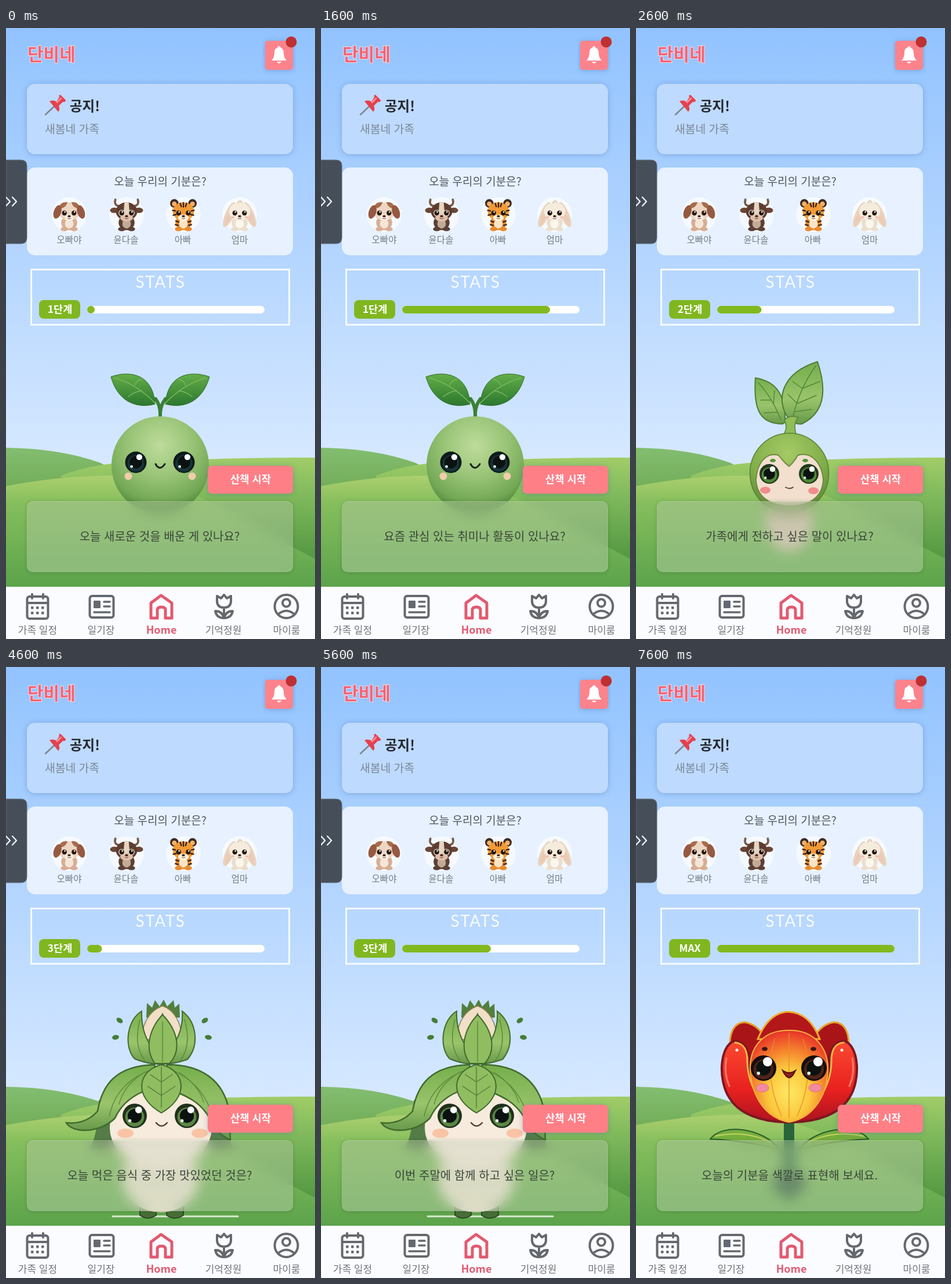
Write an HTML page that moves like this. It is 533x1051 px and loops after 8.6 s.

```html
<!DOCTYPE html>
<html lang="ko">
<head>
<meta charset="utf-8">
<title>가족 정원</title>
<style>
  html, body { margin: 0; width: 100%; height: 100%; overflow: hidden; background: #93c4ff; }
  svg { position: absolute; left: 0; top: 0; }
  text { font-family: "Noto Sans CJK KR", "Noto Sans CJK", "Noto Sans", sans-serif; }
  .mid { text-anchor: middle; }
  #panel {
    position: absolute; left: 36px; top: 814px; width: 459px; height: 122px;
    box-sizing: border-box; border-radius: 10px; border: 1px solid rgba(255,255,255,.12);
    background: linear-gradient(rgba(190,200,180,.36), rgba(215,222,205,.34));
    backdrop-filter: blur(11px); box-shadow: 0 1px 6px rgba(30,70,20,.25);
  }
</style>
</head>
<body>
<svg id="scene" width="533" height="1051" viewBox="0 0 533 1051"></svg>
<div id="panel"></div>
<svg id="ui" width="533" height="1051" viewBox="0 0 533 1051"></svg>
<script>
const $ = id => document.getElementById(id);

const gradient = (id, kind, attrs, ...stops) =>
  `<${kind}Gradient id="${id}" ${attrs}>` +
  stops.map(([at, c]) => `<stop offset="${at}" stop-color="${c}"/>`).join('') +
  `</${kind}Gradient>`;
const down = (id, ...stops) => gradient(id, 'linear', 'x1="0" y1="0" x2="0" y2="1"', ...stops);
const path = (d, fill, rest = '') => `<path d="${d}" fill="${fill}" ${rest}/>`;
const line = (d, color, w = 2) =>
  path(d, 'none', `stroke="${color}" stroke-width="${w}" stroke-linecap="round" stroke-linejoin="round"`);
const oval = (x, y, rx, ry, fill, rest = '') =>
  `<ellipse cx="${x}" cy="${y}" rx="${rx}" ry="${ry}" fill="${fill}" ${rest}/>`;
const dot = (x, y, r, fill, rest) => oval(x, y, r, r, fill, rest);
const box = (x, y, w, h, r, fill, rest = '') =>
  `<rect x="${x}" y="${y}" width="${w}" height="${h}" rx="${r}" fill="${fill}" ${rest}/>`;
const label = (x, y, size, fill, str, rest = 'class="mid"') =>
  `<text x="${x}" y="${y}" font-size="${size}" fill="${fill}" ${rest}>${str}</text>`;
const mirror = (axis, s) => s + `<g transform="matrix(-1 0 0 1 ${2 * axis} 0)">${s}</g>`;

function eye(x, y, r, rim, iris) {
  return dot(x, y, r, rim) + dot(x, y + r * .1, r * .78, iris) + dot(x, y, r * .58, '#0c1210') +
    dot(x + r * .32, y - r * .48, r * .28, '#fff') + dot(x - r * .4, y + r * .4, r * .13, '#dff0e4');
}
const eyes = (x1, x2, y, r, rim, iris) => eye(x1, y, r, rim, iris) + eye(x2, y, r, rim, iris);

const sprout =
  line('M266 668 Q267 650 258 638 M266 662 Q267 648 275 638', '#3b7f35', 6) +
  mirror(266,
    path('M257 647 C222 656 192 640 181 600 C214 588 254 596 257 647Z', 'url(#leaf)', 'stroke="#2d6b2b"') +
    line('M257 645 Q225 612 187 602 M234 624 Q222 625 211 634 M222 614 Q226 606 235 604', '#79b85c', 1.5)) +
  dot(266, 752, 84, 'url(#ball)') +
  eyes(224, 307, 747, 18.5, '#0e1a1a', '#17353a') +
  dot(211, 771, 6.5, '#f2cdaa') + dot(321, 771, 6.5, '#f2cdaa') +
  line('M258 750 Q265 763 274 750', '#16220f', 3);

const seedling =
  oval(264, 846, 40, 54, '#cfc0a8') +
  path('M253 681 C216 681 202 660 206 602 C242 608 258 630 257 678Z', 'url(#leaf2)', 'stroke="#4c7d33" stroke-width="2"') +
  line('M250 674 Q235 636 211 610 M237 647 L239 624 M232 640 L215 640 M244 661 L221 662', '#4f8a39', 1.5) +
  path('M262 670 C241 640 250 594 313 574 C327 615 330 660 286 681 Q271 683 262 670Z', 'url(#leaf2)', 'stroke="#4c7d33" stroke-width="2"') +
  line('M270 674 Q279 625 310 581 M278 646 L262 630 M278 646 L311 632 M287 620 L270 608 M287 620 L317 608 M274 660 L303 656', '#4f8a39', 1.5) +
  path('M253 702 Q263 687 256 675 Q264 664 280 670 Q270 678 277 703Z', '#8fbe58', 'stroke="#55843a" stroke-width="1.5"') +
  oval(264.5, 766, 68, 69, 'url(#hood)', 'stroke="#587f38" stroke-width="1.5"') +
  path('M207 777 C209 746 226 729 246 735 Q254 746 264 754 Q273 746 279 735 C304 728 321 750 323 777 C322 805 302 822 264 822 C228 822 208 804 207 777Z', '#f2dfce', 'stroke="#6d8a42" stroke-width="2"') +
  eyes(230, 298, 767, 17, '#26371f', '#4f8a37') +
  oval(236, 744, 5, 3, '#55933c') + oval(292, 744, 5, 3, '#55933c') +
  oval(223, 795, 9, 6, '#f08d8d') + oval(306, 796, 9, 6, '#f08d8d') +
  line('M258 790 Q265 794 271 790', '#5d4434', 2);

const bud =
  line('M184 945 H400', '#d9ead2', 3) +
  path('M231 925 H259 V943 Q245 953 231 943Z M277 925 H306 V943 Q291 953 277 943Z', '#486f38', 'stroke="#294a23" stroke-width="2"') +
  path('M160 745 Q160 800 144 830 H391 Q378 790 378 745Z', '#547c46') +
  oval(267, 880, 66, 58, '#e1ddc4') +
  oval(267, 792, 88, 72, '#f6ebdc') +
  path('M256 684 C190 686 166 718 158 764 C143 781 124 786 104 784 C114 802 161 803 188 776 C203 743 232 729 268 720Z', 'url(#leaf2)', 'stroke="#416a2d" stroke-width="2.5"') +
  path('M278 684 C336 684 376 710 385 765 L387 814 Q360 800 351 776 C333 743 302 735 268 720Z', 'url(#leaf2)', 'stroke="#416a2d" stroke-width="2.5"') +
  line('M250 693 Q190 715 178 773 M239 697 Q204 718 195 752 M288 694 Q342 718 356 774 M299 698 Q332 718 341 749', '#5f8d3d', 1.5) +
  path('M268 684 C228 694 218 738 268 767 C318 738 308 694 268 684Z', '#91bd61', 'stroke="#416a2d" stroke-width="2"') +
  line('M268 688 V758 M268 714 L249 701 M268 714 L287 701 M268 737 L244 721 M268 737 L292 721', '#527f38', 1.5) +
  path('M242 603 L243 578 L252 586 L257 573 L265 584 L272 572 L278 584 L289 573 L291 586 L299 579 L300 603Z', '#527f3c') +
  path('M233 640 Q238 595 270 583 Q301 594 305 645Z', '#f2dfc8', 'stroke="#8a8055" stroke-width="1.5"') +
  path('M234 592 C208 607 203 655 222 674 Q265 692 313 675 C334 650 329 611 304 592 Q306 625 289 649 L270 597 L248 649 Q233 625 234 592Z', 'url(#leaf2)', 'stroke="#416a2d" stroke-width="2"') +
  path('M270 598 C244 626 240 660 257 682 H282 C303 660 297 626 270 598Z', '#91bd61', 'stroke="#416a2d" stroke-width="2"') +
  line('M231 607 Q219 650 240 678 M308 607 Q321 650 300 678 M270 610 V679', '#5c8a3d', 1.5) +
  [[196, 608, 35], [189, 637, -10], [343, 608, -35], [349, 637, 10]].map(([x, y, a]) =>
    oval(x, y, 6, 4, '#447d39', `transform="rotate(${a} ${x} ${y})"`)).join('') +
  eyes(222, 312, 772, 21, '#20301d', '#5b8745') +
  oval(206, 802, 14, 8, '#f9c4a5') + oval(334, 802, 14, 8, '#f9c4a5') +
  line('M259 784 Q268 795 278 784', '#54402f', 2.5);

const tulip =
  path('M255 776 H273 V916 H255Z', '#28663a') +
  oval(264, 888, 29, 22, '#35633b') +
  mirror(264.5,
    path('M128 812 C149 784 219 792 248 830 Q185 814 128 812Z', '#77af3e', 'stroke="#275c29" stroke-width="2"') +
    line('M137 807 Q190 796 232 818', '#c3d363', 2) +
    path('M162 660 C160 630 168 612 187 611 Q209 614 222 637 L210 690Z', '#a91419', 'stroke="#e9a32c" stroke-width="3"')) +
  path('M210 640 Q229 594 263 593 Q300 595 317 640Z', '#b3171a', 'stroke="#efae32" stroke-width="3"') +
  mirror(264.5,
    path('M170 643 C144 651 141 711 161 741 C178 769 215 782 259 783 C209 748 193 711 196 671 Q190 645 170 643Z', 'url(#petal)', 'stroke="#7d1720" stroke-width="4"') +
    line('M171 646 C188 648 192 661 192 680 C193 724 221 761 253 779', '#f6b642', 3) +
    line('M156 673 Q151 698 161 721', '#ff7768', 3)) +
  path('M264 625 C217 624 195 657 197 694 C200 741 224 776 264 783 C304 776 329 741 331 694 C332 657 309 624 264 625Z', 'url(#flame)', 'stroke="#f2b33d" stroke-width="2"') +
  line('M264 630 V776 M239 640 Q220 705 251 772 M288 640 Q309 705 278 772', '#eb8c2c', 1.3) +
  eyes(220, 307, 690, 22, '#160d0b', '#4e2417') +
  dot(227, 679, 8, '#fff') + dot(314, 679, 8, '#fff') +
  oval(222, 657, 5, 3.5, '#3b1613') + oval(306, 657, 5, 3.5, '#3b1613') +
  oval(218, 724, 11, 7, '#f28aa0', 'stroke="#e66d80"') + oval(309, 724, 11, 7, '#f28aa0', 'stroke="#e66d80"') +
  path('M253 694 Q264 719 275 694 Q264 702 253 694Z', '#8c1f1b', 'stroke="#571311" stroke-width="2"') +
  dot(174, 659, 2.5, '#fff') + dot(355, 659, 2.5, '#fff');

const friends = [sprout, seedling, bud, tulip];

$('scene').innerHTML = '<defs>' +
  down('sky', [0, '#92c3ff'], [.5, '#b3d5ff'], [1, '#d9eaff']) +
  down('far', [0, '#83bd70'], [.3, '#72ad58'], [1, '#5b9b45']) +
  down('side', [0, '#a1cd68'], [.3, '#7fb95c'], [.75, '#569a43'], [1, '#559a43']) +
  down('near', [0, '#accf6e'], [.25, '#85be5d'], [1, '#5ca34b']) +
  down('leaf', [0, '#64ad48'], [1, '#2b782f']) +
  down('leaf2', [0, '#75ae4c'], [.6, '#9ac46b'], [1, '#67994a']) +
  down('petal', [0, '#fb4a31'], [.6, '#e8211f'], [1, '#ad1320']) +
  gradient('ball', 'radial', 'cx=".5" cy=".3" r=".72"', [0, '#bedc9c'], [.45, '#99c477'], [.8, '#73a855'], [1, '#4c8238']) +
  gradient('hood', 'radial', 'cx=".48" cy=".25" r=".8"', [0, '#a5ca66'], [.6, '#80ae48'], [1, '#577f32']) +
  gradient('flame', 'radial', 'cx=".5" cy=".68" r=".68"', [0, '#ffe965'], [.4, '#fbc83d'], [.72, '#f47b2c'], [1, '#e8332a']) +
  '</defs>' +
  '<rect width="533" height="770" fill="url(#sky)"/>' +
  path('M0 722 Q92 723 163 748 L240 790 V961 H0Z', 'url(#far)') +
  path('M95 770 Q155 746 245 746 Q390 738 533 739 V961 H95Z', 'url(#side)') +
  path('M0 788 Q95 770 180 770 C300 768 414 852 533 913 V961 H0Z', 'url(#near)') +
  friends.map((f, i) => `<g id="friend${i}">${f}</g>`).join('');

function face(x, body, head, belly, ears, extra) {
  return dot(x, 321, 30, '#fff', 'opacity=".65"') + `<g transform="translate(${x} 321) scale(.92)">` +
    oval(0, 15, 15, 14, body) + oval(0, 17, 8, 9, belly) +
    oval(-9, 27, 7, 4, body) + oval(9, 27, 7, 4, body) +
    ears + oval(0, -6, 20, 17, head) + extra +
    dot(-9, -3, 4.5, '#251712') + dot(9, -3, 4.5, '#251712') +
    dot(-8, -5, 1.4, '#fff') + dot(10, -5, 1.4, '#fff') +
    oval(0, 3, 3, 2, '#392019') + line('M-3 7 Q0 9 3 7', '#60382b', 1) + '</g>';
}
const dog = face(109, '#d7ae94', '#edd6c2', '#f5e6d8', '',
  path('M-3 -23 Q-15 -25 -20 -13 Q-8 -9 -3 -23Z M4 -23 Q16 -25 20 -13 Q9 -9 4 -23Z', '#a76c4c') +
  mirror(0, oval(-22, -5, 7, 13, '#965a42', 'transform="rotate(18 -22 -5)"')) + oval(0, 6, 8, 6, '#faeee3'));
const cow = face(208, '#5b4036', '#5e3d30', '#c1aa96',
  mirror(0, line('M-14 -16 Q-24 -17 -21 -28', '#765a49', 4) + oval(-23, -8, 8, 5, '#6b4637')),
  path('M-4 -23 H4 L6 1 H-6Z', '#e5d5c1') + oval(0, 6, 12, 7, '#dfbea9') +
  dot(-9, -3, 6, '#e9dacb') + dot(9, -3, 6, '#e9dacb'));
const tiger = face(306, '#e88b30', '#f39a35', '#fae4c7',
  mirror(0, dot(-17, -21, 8, '#3f2a21') + dot(-17, -20, 4.5, '#f1b268')),
  line('M0 -22 V-14 M-6 -21 L-4 -15 M6 -21 L4 -15 M-20 -8 L-15 -7 M20 -8 L15 -7 M-19 1 L-14 0 M19 1 L14 0', '#32211b', 2.5) +
  oval(0, 6, 10, 6, '#fff2dd') + line('M-14 12 L-9 14 M14 12 L9 14 M-15 19 L-10 20 M15 19 L10 20', '#32211b', 2.5));
const rabbit = face(403, '#eadfcd', '#f5ecdd', '#fcf6ec',
  mirror(0, oval(-19, 0, 8, 25, '#e8d4bd', 'transform="rotate(23 -19 0)"') +
    oval(-20, 3, 4, 19, '#edc9b7', 'transform="rotate(23 -20 3)"')),
  line('M-3 -22 Q0 -29 4 -23', '#e2d1b7', 3) + oval(-13, 5, 3, 2, '#f3bdb1') + oval(13, 5, 3, 2, '#f3bdb1'));

const gray = '#65696f', pink = '#e25a70', bold = 'class="mid" font-weight="700"';

const header =
  label(37, 56, 30, '#f26375', '단비네', 'font-weight="700" stroke="#ffd6dd" stroke-width="2" paint-order="stroke"') +
  box(447, 22, 48, 50, 5, '#fc838c', 'filter="url(#soft)"') +
  path('M458 56 Q463 51 463 42 Q463 35 468 34 Q471 28 474 34 Q479 36 479 43 Q479 51 484 56Z M467 58 H475 Q471 64 467 58Z', '#fff') +
  dot(492, 24, 9.5, '#be3032');

const notice =
  box(36, 96, 459, 121, 14, '#bedaff', 'filter="url(#soft)"') +
  line('M68 149 L83 135', '#7c8590', 2.5) +
  path('M75 126 Q82 123 87 127 L92 119 Q90 115 94 115 L103 124 Q103 128 98 127 L91 134 Q94 141 90 144Z', '#e5414e') +
  line('M88 128 L95 121', '#ff929a', 2.5) +
  label(110, 143, 23.5, '#24282d', '공지!', 'font-weight="900"') +
  label(67, 181, 19.3, '#7b8795', '새봄네 가족', '');

const moods =
  box(36, 240, 459, 151, 14, '#e7f1ff') +
  label(266, 271, 19, '#4e555e', '오늘 우리의 기분은?', 'class="mid" font-weight="500"') +
  dog + cow + tiger + rabbit +
  ['오빠야', '윤다솔', '아빠', '엄마'].map((s, i) => label(109 + 98 * i, 370, 15.5, '#747b85', s)).join('') +
  path('M0 227 H26 Q36 227 36 237 V361 Q36 371 26 371 H0Z', '#454e59', 'stroke="#69727d"') +
  line('M0 291 L7 298.5 L0 306 M11 291 L18 298.5 L11 306', '#f4f7fa', 2.2);

const stats =
  box(43.5, 415.5, 445, 95, 0, 'none', 'stroke="#f5faff" stroke-width="3"') +
  `<text x="266.5" y="447" class="mid" font-size="28" fill="#f8fbff" style="font-family:Lato,sans-serif" letter-spacing="1.5">STATS</text>` +
  box(57, 468, 71, 32, 8, '#80b720') +
  `<text id="level" x="93" y="490" ${bold} font-size="17.5" fill="#fff"></text>` +
  box(140, 478, 306, 13, 6.5, '#fff') +
  `<rect id="bar" x="140" y="478" height="13" rx="6.5" fill="#82b91f"/>`;

const action =
  box(348, 753, 147, 48, 7, '#ff7f87', 'filter="url(#soft)"') +
  label(422, 783, 17.7, '#fff', '산책 시작', bold) +
  `<text id="question" x="265" y="882" class="mid" font-size="20" fill="#3a4538"></text>`;

const calendarDots = [0, 1, 2, 3, 4, 5].map(i =>
  box(43 + i % 3 * 9, 995 + (i > 2 ? 9 : 0), 4.5, 4.5, 1, gray)).join('');

const nav =
  box(0, 961, 533, 90, 0, '#fbfcff') + line('M0 961.5 H533', '#e5ebe7', 1) +
  box(36.5, 978, 36, 38, 4, 'none', `stroke="${gray}" stroke-width="4"`) +
  line('M37 989 H72 M45 974 V981 M64 974 V981', gray, 4) + calendarDots +
  box(144.5, 977, 41, 37, 4, 'none', `stroke="${gray}" stroke-width="4"`) +
  box(151, 985, 12, 13, 1, gray) + line('M169 987 H179 M169 995 H179 M152 1005 H179', gray, 3.5) +
  line('M250 989 L267.5 976 L286 989 V1015 H275 V1001 Q275 996 268 996 Q261 996 261 1001 V1015 H250Z', pink, 5) +
  line('M364 977 L371 981 L376 975 L381 981 L388 977 V987 Q387 997 376 997 Q365 997 364 987Z M376 997 V1015 M376 1015 Q363 1015 361 1003 Q372 1002 376 1015 Q380 1002 391 1003 Q389 1015 376 1015', gray, 4) +
  dot(483.5, 995, 20, 'none', `stroke="${gray}" stroke-width="4"`) +
  dot(483.5, 989, 6.5, 'none', `stroke="${gray}" stroke-width="4"`) +
  line('M470 1008 Q483.5 997 497 1008', gray, 4) +
  [[54.5, '가족 일정'], [164, '일기장'], [375, '기억정원'], [484, '마이룸']]
    .map(([x, s]) => label(x, 1042, 17, '#70747a', s)).join('') +
  label(268, 1042, 18, pink, 'Home', bold);

$('ui').innerHTML =
  '<defs><filter id="soft" x="-10%" y="-20%" width="120%" height="140%">' +
  '<feDropShadow dx="0" dy="1" stdDeviation="4" flood-color="#4269a0" flood-opacity=".38"/></filter></defs>' +
  header + notice + moods + stats + action + nav;

const questions = [
  '오늘 새로운 것을 배운 게 있나요?',
  '오늘 가장 많이 웃은 때는 언제인가요?',
  '요즘 관심 있는 취미나 활동이 있나요?',
  '가족에게 전하고 싶은 말이 있나요?',
  '오늘 하루 중 가장 기억에 남는 순간은?',
  '오늘 먹은 음식 중 가장 맛있었던 것은?',
  '이번 주말에 함께 하고 싶은 일은?',
  '최근에 찍은 가족 사진이 있다면 공유해 주세요!',
  '오늘의 기분을 색깔로 표현해 보세요.'
];
const lastStep = questions.length - 1;

// Every answer earns 5/12 of a level.
function show(step) {
  const points = step * 5;
  const max = step === lastStep;
  const stage = max ? 3 : Math.floor(points / 12);
  const progress = max ? 1 : points % 12 / 12;
  friends.forEach((_, i) => $('friend' + i).style.display = i === stage ? '' : 'none');
  $('level').textContent = max ? 'MAX' : stage + 1 + '단계';
  $('bar').setAttribute('width', Math.max(13, 306 * progress));
  $('question').textContent = questions[step];
}

const start = performance.now();
let shown = 0;
function tick(now) {
  const t = Math.max(0, now - start) % 8600;
  const step = t < 600 ? 0 : 1 + Math.floor((t - 600) / 1000);
  if (step !== shown) show(shown = step);
  requestAnimationFrame(tick);
}
show(0);
requestAnimationFrame(tick);
</script>
</body>
</html>
```
